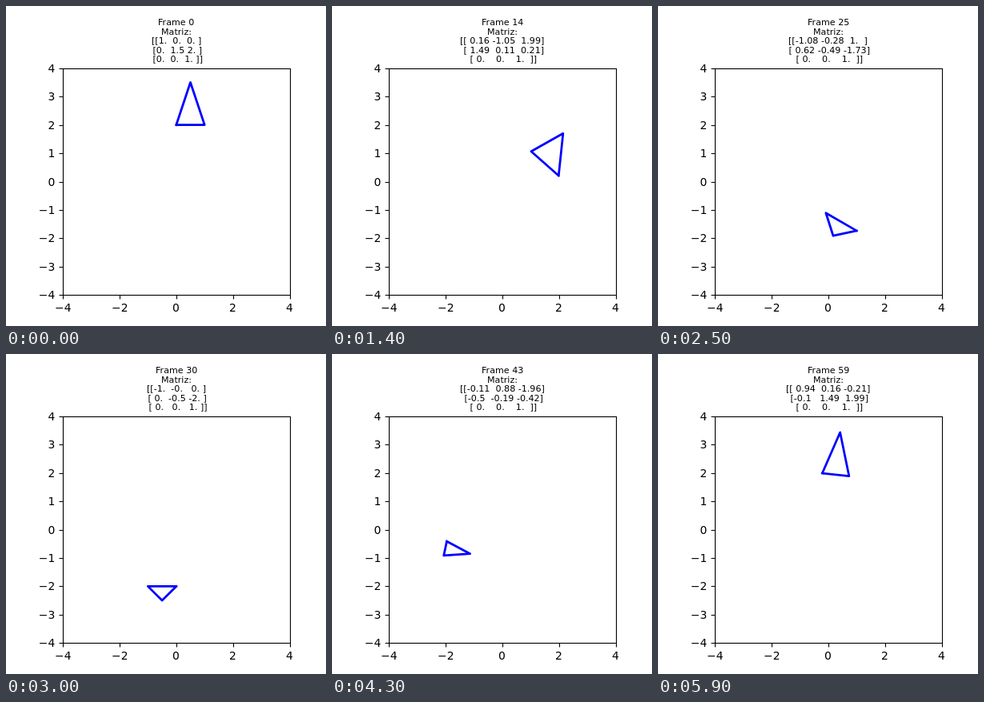
An HTML page with a canvas for the animation above (6000 ms loop, 400 by 400 pixels).

```html
<!DOCTYPE html>
<html lang="es">
<head>
<meta charset="utf-8">
<title>Matriz</title>
<style>
  html, body { margin: 0; width: 100%; height: 100%; overflow: hidden; background: #fff; }
  canvas { display: block; width: 400px; height: 400px; }
</style>
</head>
<body>
<canvas id="stage" width="400" height="400"></canvas>
<script>
const ctx = document.getElementById('stage').getContext('2d');
const STEPS = 60, STEP_MS = 100;
const PT = 100 / 72;
const ORIGIN_X = 212.8, ORIGIN_Y = 219.5, UNIT = 35.44;
const TRIANGLE = [[0, 0], [1, 0], [0.5, 1], [0, 0]];
const TITLE_BASELINES = [24, 36, 47, 59, 70];

const toX = x => ORIGIN_X + x * UNIT;
const toY = y => ORIGIN_Y - y * UNIT;
const snap = v => Math.floor(v + 0.5) + 0.5;
const setFont = pt => { ctx.font = `${pt * PT}px "DejaVu Sans", sans-serif`; };

function line(x1, y1, x2, y2) {
  ctx.beginPath();
  ctx.moveTo(x1, y1);
  ctx.lineTo(x2, y2);
  ctx.stroke();
}

function textCentered(text, x, baseline) {
  ctx.textAlign = 'left';
  ctx.fillText(text, Math.round(x - ctx.measureText(text).width / 2), baseline);
}

// Scale, then rotate, then move along a circle of radius 2.
function matrixAt(step) {
  const angle = 2 * Math.PI * step / STEPS;
  const s = Math.sin(angle), c = Math.cos(angle);
  const sx = 1 + 0.5 * s, sy = 1 + 0.5 * c;
  return [[c * sx, -s * sy, 2 * s], [s * sx, c * sy, 2 * c], [0, 0, 1]];
}

// Aligns all numbers on the decimal point, without trailing zeros.
function matrixLines(m) {
  const parts = m.map(row => row.map(v => v.toFixed(2).replace(/0+$/, '').split('.')));
  const widest = k => Math.max(...parts.flat().map(p => p[k].length));
  const left = widest(0), right = widest(1);
  const rows = parts.map(row =>
    '[' + row.map(([a, b]) => a.padStart(left) + '.' + b.padEnd(right)).join(' ') + ']');
  return ['[' + rows[0], ' ' + rows[1], ' ' + rows[2] + ']'];
}

function drawAxes() {
  const left = snap(toX(-4)), right = snap(toX(4));
  const top = snap(toY(4)), bottom = snap(toY(-4));
  ctx.strokeStyle = ctx.fillStyle = '#000';
  ctx.lineWidth = 0.8 * PT;
  ctx.lineCap = 'butt';
  ctx.lineJoin = 'miter';
  ctx.strokeRect(left, top, right - left, bottom - top);

  setFont(10);
  for (let v = -4; v <= 4; v++) {
    const label = String(v).replace('-', '\u2212');
    const y = snap(toY(v));
    line(left - 5, y, left, y);
    ctx.textAlign = 'right';
    ctx.fillText(label, 61.3, y + 4.5);
    if (v % 2 === 0) {
      const x = snap(toX(v));
      line(x, bottom, x, bottom + 5);
      textCentered(label, toX(v), 382);
    }
  }
}

function drawTriangle(m) {
  ctx.strokeStyle = '#00f';
  ctx.lineWidth = 2 * PT;
  ctx.lineCap = 'square';
  ctx.lineJoin = 'round';
  ctx.beginPath();
  for (const [x, y] of TRIANGLE) {
    const [px, py] = m.map(([a, b, t]) => a * x + b * y + t);
    ctx.lineTo(toX(px), toY(py));
  }
  ctx.stroke();
}

function draw(step) {
  const m = matrixAt(step);
  ctx.fillStyle = '#fff';
  ctx.fillRect(0, 0, 400, 400);
  drawTriangle(m);
  drawAxes();
  setFont(8);
  [`Frame ${step}`, 'Matriz:', ...matrixLines(m)]
    .forEach((text, i) => textCentered(text, ORIGIN_X, TITLE_BASELINES[i]));
}

let start = null;
function tick(now) {
  if (start === null) start = now;
  draw(Math.floor((now - start) / STEP_MS) % STEPS);
  requestAnimationFrame(tick);
}
draw(0);
requestAnimationFrame(tick);
</script>
</body>
</html>
```
